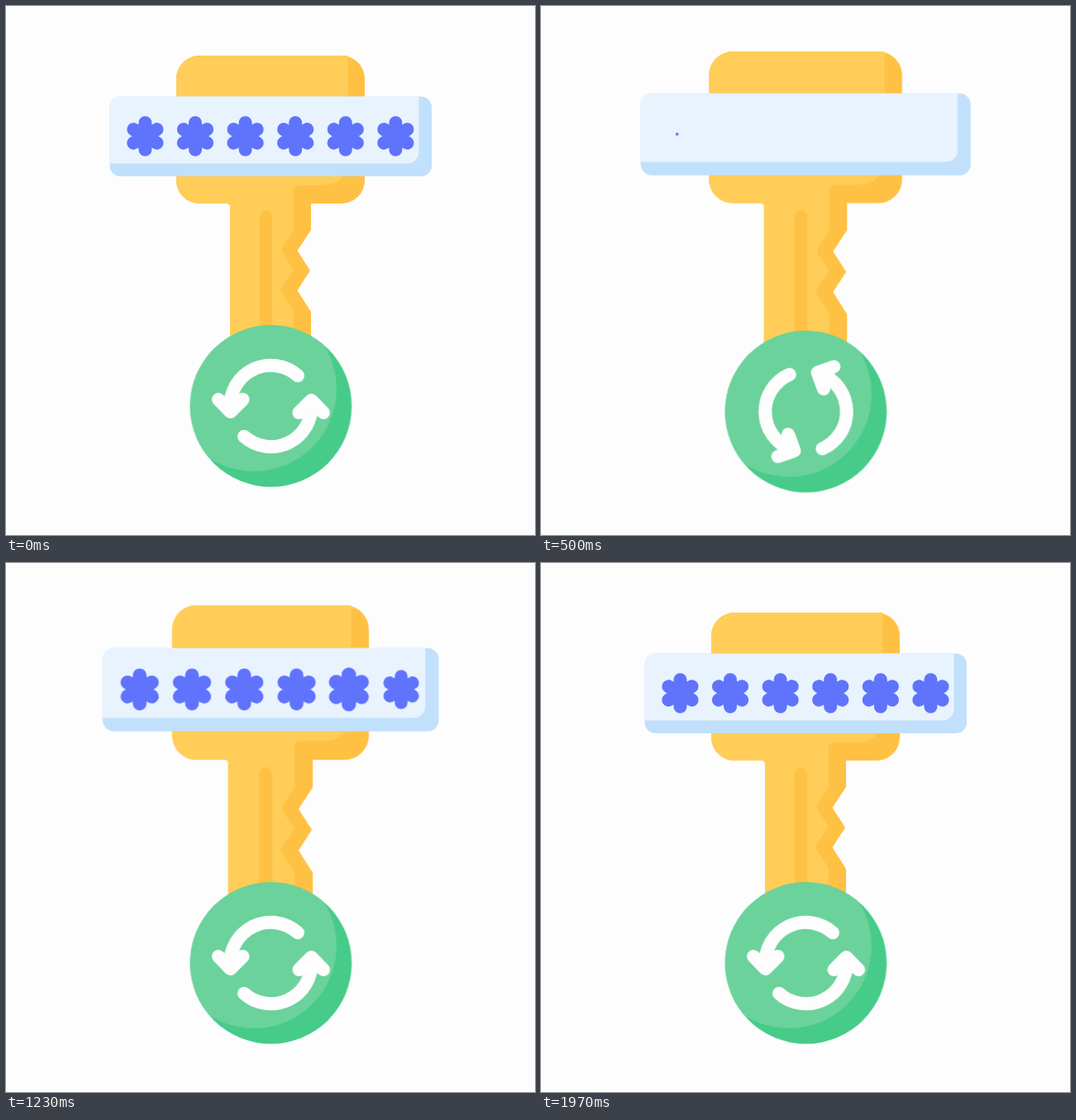
These frames come from a looping animation (640x640 px, 2.01 s). An HTML page without scripts:

```html
<!DOCTYPE html>
<html lang="en">
<head>
<meta charset="utf-8">
<title>Password key refresh</title>
<style>
  html, body { margin: 0; width: 100%; height: 100%; overflow: hidden; background: #fdfdfd; }
  svg { display: block; width: 100%; height: 100%; }

  .key, .disc, .arrows, .gone use, .typed, .typed use { animation: 2010ms linear infinite; }

  .key { transform-origin: 320px 260px; animation-name: breathe; }
  .disc { animation-name: dip; }
  .arrows { animation-name: turn; }
  .light { fill: #ffcd58; }
  .dark { fill: #ffc143; }

  .row use { --x: calc(168.4px + var(--i) * 60.6px); translate: var(--x) 157.5px; }
  .gone use { animation-name: vanish; }
  .typed { animation-name: reveal; animation-timing-function: step-end; }
  .typed use { animation-name: pop; animation-delay: calc(var(--i) * 115ms - 1520ms); }

  @keyframes breathe {
    0%, 100% { transform: scale(1); animation-timing-function: cubic-bezier(.37, 0, .63, 1); }
    50% { transform: scale(1.05); animation-timing-function: cubic-bezier(.37, 0, .63, 1); }
  }
  @keyframes dip {
    0%, 6.5% { transform: translateY(0); animation-timing-function: cubic-bezier(.37, 0, .63, 1); }
    33.8% { transform: translateY(8.8px); animation-timing-function: cubic-bezier(.37, 0, .63, 1); }
    61.2%, 100% { transform: translateY(0); }
  }
  @keyframes turn {
    0%, 8.6% { transform: rotate(0deg); animation-timing-function: cubic-bezier(.2, 0, .8, 1); }
    50.5%, 100% { transform: rotate(-180deg); }
  }
  @keyframes vanish {
    0%, 13.4% { scale: 1; animation-timing-function: ease-in; }
    21.4%, 74.99% { scale: 0; }
    75%, 100% { scale: 1; }
  }
  @keyframes reveal {
    0% { visibility: hidden; }
    24% { visibility: visible; }
    75%, 100% { visibility: hidden; }
  }
  /* back to zero while the row is hidden, ready for the next round */
  @keyframes pop {
    0% { scale: 0; animation-timing-function: cubic-bezier(.25, .4, .7, .95); }
    11% { scale: 1.06; animation-timing-function: ease-in-out; }
    20%, 60% { scale: 1; }
    60.01%, 100% { scale: 0; }
  }
</style>
</head>
<body>
<svg viewBox="0 0 640 640" xmlns="http://www.w3.org/2000/svg">
  <defs>
    <g id="star">
      <circle r="13" fill="#6073fc"/>
      <path d="M0-16.3V16.3M-14.1-8.15 14.1 8.15M-14.1 8.15 14.1-8.15" stroke="#6073fc" stroke-width="16" stroke-linecap="round"/>
    </g>
    <g id="arrow" fill="none" stroke="#fdfdfd" stroke-width="16" stroke-linecap="round" stroke-linejoin="round">
      <path d="M32.5-36.8A49 49 0 0 0-49 3"/>
      <path d="M-63.5-8-49 7-34-8"/>
    </g>
    <clipPath id="face"><circle r="97.8"/></clipPath>
  </defs>

  <g class="key">
    <path class="dark" d="M234 60H406A28 28 0 0 1 434 88V211A28 28 0 0 1 406 239H369V271L352.5 296 368 320 352.5 344 369 370V450H271V243Q271 239 267 239H234A28 28 0 0 1 206 211V88A28 28 0 0 1 234 60Z"/>
    <path class="light" d="M234 60H413.5V190A28 28 0 0 1 386 217H354Q348 217 348 223V271L335 291Q333 295 335 299L348 319 333 340Q332 343 333 346L348 369V450H271V243Q271 239 267 239H234A28 28 0 0 1 206 211V88A28 28 0 0 1 234 60Z"/>
    <path d="M314.5 255V450" stroke="#ffc143" stroke-width="15" stroke-linecap="round"/>

    <rect x="125.5" y="109.5" width="389.5" height="96.5" rx="13" fill="#c1e0fc"/>
    <path d="M138.5 109.5H499.5V176A14 14 0 0 1 485.5 190.5H125.5V122.5A13 13 0 0 1 138.5 109.5Z" fill="#e8f3fe"/>

    <g class="row gone">
      <use href="#star" style="--i:0"/>
      <use href="#star" style="--i:1"/>
      <use href="#star" style="--i:2"/>
      <use href="#star" style="--i:3"/>
      <use href="#star" style="--i:4"/>
      <use href="#star" style="--i:5"/>
    </g>
    <g class="row typed">
      <use href="#star" style="--i:0"/>
      <use href="#star" style="--i:1"/>
      <use href="#star" style="--i:2"/>
      <use href="#star" style="--i:3"/>
      <use href="#star" style="--i:4"/>
      <use href="#star" style="--i:5"/>
    </g>
  </g>

  <g class="disc">
    <g transform="translate(320.5 484)">
      <circle r="97.8" fill="#46cb89"/>
      <g clip-path="url(#face)"><circle cx="-20.5" cy="-21" r="100" fill="#6bd29c"/></g>
      <g class="arrows">
        <use href="#arrow"/>
        <use href="#arrow" transform="rotate(180)"/>
      </g>
    </g>
  </g>
</svg>
</body>
</html>
```
